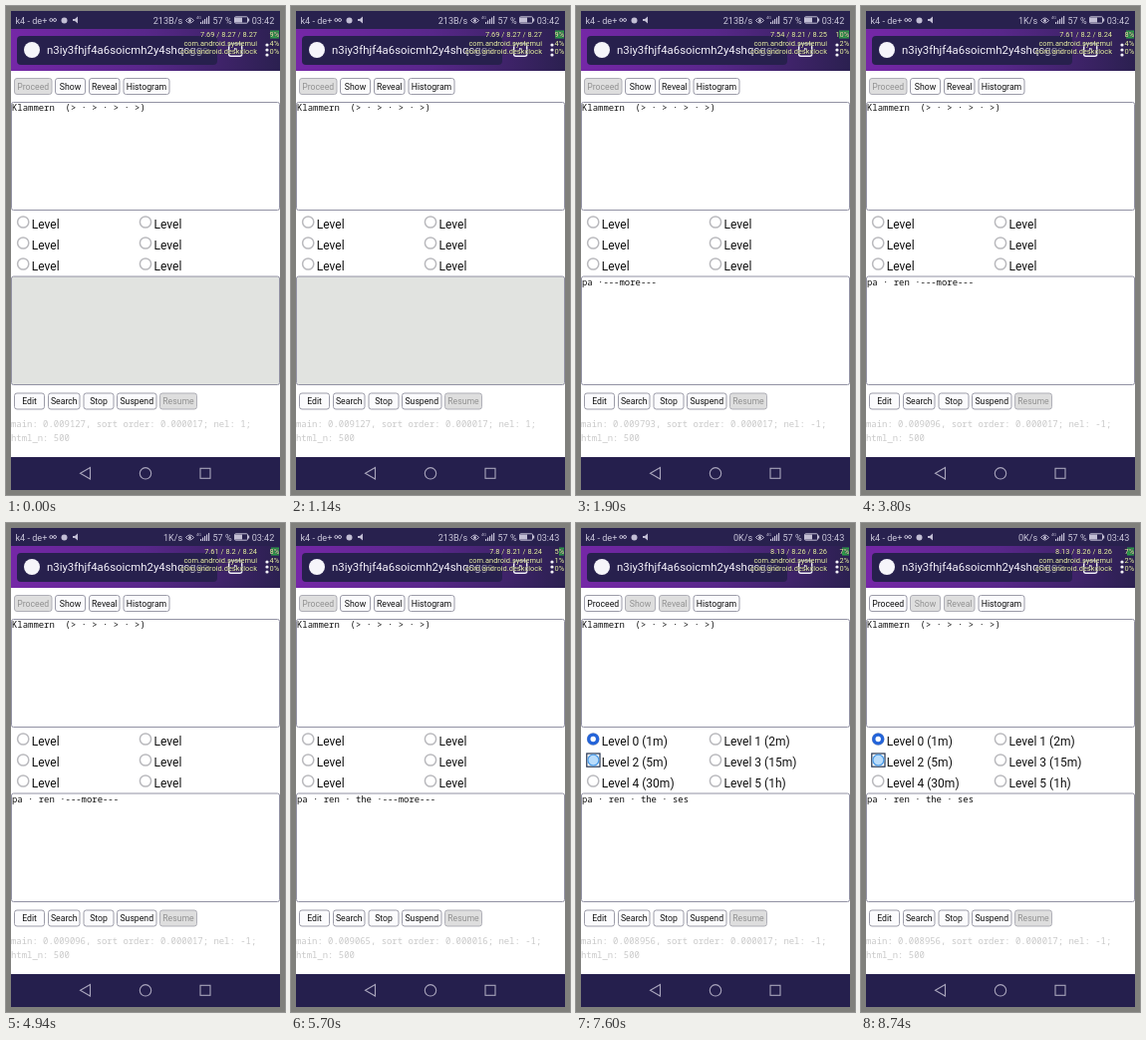
These frames come from a looping animation (280 px wide and 490 px high, 9500 ms). An HTML page:

```html
<!DOCTYPE html>
<html lang="en">
<head>
<meta charset="utf-8">
<title>Phone quiz</title>
<style>
html, body { margin: 0; width: 100%; height: 100%; overflow: hidden; background: #80807c; }
svg { display: block; width: 280px; height: 490px; }
text { font-family: Roboto, sans-serif; white-space: pre; }
.bar { font-size: 9.1px; fill: #cac7da; }
.url { font-size: 11.4px; }
.load { font-size: 7.45px; fill: #e9eea9; text-anchor: end; paint-order: stroke; stroke: #26203f; stroke-opacity: .55; stroke-width: 1px; }
.mono { font: 8.94px "Noto Sans Mono", "DejaVu Sans Mono", monospace; fill: #111; }
.log { fill: #c9c9c9; }
.label { font-size: 12px; fill: #111; }
.btn rect { fill: #fbfbfd; stroke: #9191a0; stroke-width: .9; }
.btn text { font-size: 8.7px; fill: #111; text-anchor: middle; }
.btn.off rect { fill: #dedede; stroke: #a9a9b1; }
.btn.off text { fill: #929292; }
.ring { fill: #fff; stroke: #b9b9bd; stroke-width: 1.5; }
.area { fill: #fff; stroke: #9292a4; stroke-width: 1; }
.area.off { fill: #e1e3e0; }
.icon { fill: none; stroke: #c2bed4; stroke-width: 1; }
.solid { fill: #c2bed4; }
</style>
</head>
<body>
<svg id="stage" viewBox="0 0 280 490">
  <defs>
    <linearGradient id="purple">
      <stop offset="0" stop-color="#7527a7"/>
      <stop offset=".5" stop-color="#58278a"/>
      <stop offset="1" stop-color="#2b2050"/>
    </linearGradient>
    <linearGradient id="fade" gradientUnits="userSpaceOnUse" x1="178" x2="206">
      <stop offset="0" stop-color="#f4f1fa"/>
      <stop offset="1" stop-color="#f4f1fa" stop-opacity=".15"/>
    </linearGradient>
  </defs>
  <rect width="280" height="490" fill="#80807c"/>
  <rect x="5" y="5" width="270" height="480" fill="#fff"/>
  <rect x="5" y="5" width="270" height="18" fill="#28214e"/>
  <rect x="5" y="23" width="270" height="42" fill="url(#purple)"/>
  <rect x="11" y="30" width="201" height="29" rx="4" fill="#27204d"/>
  <rect x="5" y="452" width="270" height="33" fill="#251f4d"/>

  <text class="bar" x="9.5" y="17.5">k4 - de+</text>
  <g class="icon">
    <circle cx="45.3" cy="14" r="1.5"/><circle cx="49" cy="14" r="1.5"/>
    <path d="M180.5 14.5q4-5 8 0q-4 5-8 0z"/>
    <rect x="229.5" y="10.8" width="13" height="6.4" rx="1"/>
  </g>
  <g class="solid">
    <circle cx="58.5" cy="14.5" r="3"/>
    <path d="M67 13h2l3-2.5v7l-3-2.5h-2z"/>
    <circle cx="184.5" cy="14.5" r="1.5"/>
    <path d="M230 11.5h7v5h-7zM243 12.5h1.2v3H243z"/>
    <path d="M195 18v-2h1.2v2zM197 18v-3.5h1.2V18zM199 18v-5h1.2v5zM201 18v-6.5h1.2V18zM203 18v-8h1.2v8z"/>
    <text x="191" y="13" font-size="4">4G</text>
  </g>
  <text id="rate" class="bar" x="177.2" y="17.5" text-anchor="end"></text>
  <text class="bar" x="207.5" y="17.5">57 %</text>
  <text id="clock" class="bar" x="269.3" y="17.5" text-anchor="end"></text>

  <circle cx="26" cy="44" r="8" fill="#f6f5fa"/>
  <text class="url" x="41" y="48.2" fill="url(#fade)">n3iy3fhjf4a6soicmh2y4shqcggs</text>
  <rect x="223.7" y="37.7" width="13" height="12.6" rx="2" fill="none" stroke="#f1eff7" stroke-width="1.5"/>
  <text x="230.2" y="47" font-size="8" fill="#f1eff7" text-anchor="middle">5</text>
  <g fill="#f6f4fa">
    <circle cx="262" cy="39" r="1.6"/><circle cx="262" cy="44" r="1.6"/><circle cx="262" cy="49" r="1.6"/>
  </g>
  <rect id="cpu" y="24.5" height="8" fill="#2c9b49"/>
  <text id="load" class="load" x="252" y="31"></text>
  <text class="load" x="252" y="39.8">com.android.systemui</text>
  <text class="load" x="252" y="48.3">com.android.deskclock</text>
  <text id="pct0" class="load" x="274.2" y="31"></text>
  <text id="pct1" class="load" x="274.2" y="39.8"></text>
  <text class="load" x="274.2" y="48.3">0%</text>

  <rect class="area" x="5.5" y="96.5" width="269" height="108" rx="2"/>
  <text class="mono" x="6" y="105.4">Klammern  (&gt; · &gt; · &gt; · &gt;)</text>
  <rect id="answer" class="area" x="5.5" y="271" width="269" height="108.5" rx="2"/>
  <text id="words" class="mono" x="6" y="280.2"></text>
  <g id="buttons"></g>
  <g id="levels"></g>
  <g id="picked">
    <circle cx="17.2" cy="216.5" r="4.4" fill="#fff" stroke="#2464d9" stroke-width="3.4"/>
    <rect x="10.8" y="231" width="13.2" height="13.2" fill="#fff" stroke="#22314d" stroke-width="1.2"/>
    <circle cx="17.4" cy="237.6" r="5.5" fill="#b9dcfb" stroke="#4b9be8" stroke-width="1.3"/>
  </g>
  <text id="stats" class="mono log" x="5" y="422"></text>
  <text class="mono log" x="5" y="436.2">html_n: 500</text>

  <g fill="none" stroke="#aaa6bd" stroke-width="1.1">
    <path d="M84.5 462.5v11.5l-10-5.7z"/>
    <circle cx="140" cy="468.3" r="5.7"/>
    <rect x="195" y="463.3" width="10" height="10"/>
  </g>
</svg>
<script>
const STEP = 1900;
const steps = [
  { rate: "213B/s", clock: "03:42", load: "7.69 / 8.27 / 8.27", cpu: [9, 4], stats: ["9127", 17, 1], words: "" },
  { rate: "213B/s", clock: "03:42", load: "7.54 / 8.21 / 8.25", cpu: [10, 2], stats: ["9793", 17, -1], words: "pa ·---more---" },
  { rate: "1K/s", clock: "03:42", load: "7.61 / 8.2 / 8.24", cpu: [8, 4], stats: ["9096", 17, -1], words: "pa · ren ·---more---" },
  { rate: "213B/s", clock: "03:43", load: "7.8 / 8.21 / 8.24", cpu: [5, 1], stats: ["9065", 16, -1], words: "pa · ren · the ·---more---" },
  { rate: "0K/s", clock: "03:43", load: "8.13 / 8.26 / 8.26", cpu: [7, 2], stats: ["8956", 17, -1], words: "pa · ren · the · ses", done: true }
];
const $ = id => document.getElementById(id);

function add(parent, tag, attrs, text = "") {
  const el = document.createElementNS("http://www.w3.org/2000/svg", tag);
  for (const key in attrs) el.setAttribute(key, attrs[key]);
  el.textContent = text;
  return parent.appendChild(el);
}

function button(label, x, y, width) {
  const g = add($("buttons"), "g", { class: "btn" });
  add(g, "rect", { x: x + .5, y: y + .5, width: width - 1, height: 16, rx: 2.5 });
  add(g, "text", { x: x + width / 2, y: y + 11.5 }, label);
  return g;
}

const proceed = button("Proceed", 8, 72, 38.5);
const show = button("Show", 49, 72, 31);
const reveal = button("Reveal", 83, 72, 31.5);
button("Histogram", 117.5, 72, 47);
button("Edit", 8, 387.5, 31);
button("Search", 42, 387.5, 32.5);
button("Stop", 77.5, 387.5, 31);
button("Suspend", 111, 387.5, 40.5);
button("Resume", 154, 387.5, 38).classList.add("off");

const spans = ["1m", "2m", "5m", "15m", "30m", "1h"];
const labels = spans.map((span, i) => {
  const x = 17.2 + i % 2 * 122.8, y = 216.5 + (i >> 1) * 21;
  add($("levels"), "circle", { class: "ring", cx: x, cy: y, r: 5.6 });
  return add($("levels"), "text", { class: "label", x: x + 8.6, y: y + 6.3 });
});

let shown = -1;
function render(now) {
  const index = Math.floor(now / STEP) % steps.length;
  if (index !== shown) {
    shown = index;
    const s = steps[index], done = !!s.done;
    for (const id of ["rate", "clock", "load", "words"]) $(id).textContent = s[id];
    s.cpu.forEach((n, i) => $("pct" + i).textContent = n + "%");
    $("cpu").setAttribute("x", 274 - s.cpu[0]);
    $("cpu").setAttribute("width", s.cpu[0]);
    const [main, sort, nel] = s.stats;
    $("stats").textContent = `main: 0.00${main}, sort order: 0.0000${sort}; nel: ${nel};`;
    $("answer").classList.toggle("off", !s.words);
    proceed.classList.toggle("off", !done);
    show.classList.toggle("off", done);
    reveal.classList.toggle("off", done);
    labels.forEach((el, i) => el.textContent = done ? `Level ${i} (${spans[i]})` : "Level");
    $("picked").style.display = done ? "" : "none";
  }
}

const start = performance.now();
function tick() {
  render(performance.now() - start);
  requestAnimationFrame(tick);
}
tick();
</script>
</body>
</html>
```
